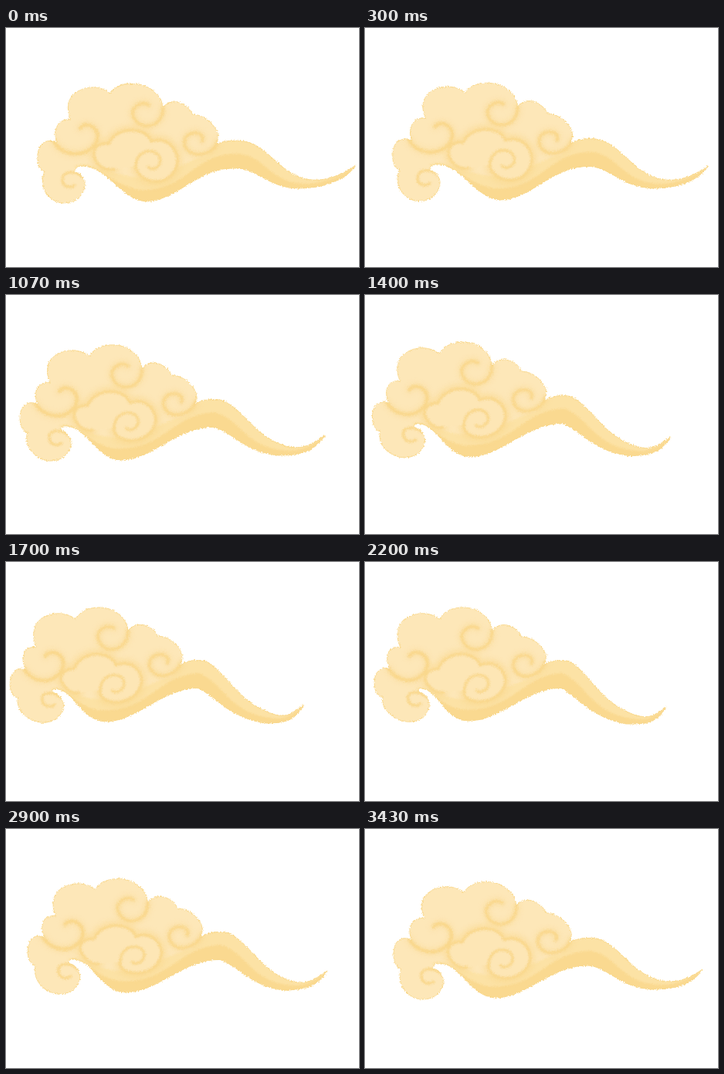
These frames come from a looping animation (457x310 px, 3500 ms). An HTML page:

```html
<!DOCTYPE html>
<html lang="en">
<head>
<meta charset="utf-8">
<title>Drifting cloud</title>
<style>
  html, body { margin: 0; width: 100%; height: 100%; overflow: hidden; background: #fff; }
  svg { display: block; width: 100%; height: 100%; }
</style>
</head>
<body>
<svg viewBox="0 0 457 310">
  <defs>
    <filter id="rough" filterUnits="userSpaceOnUse" x="0" y="0" width="457" height="310" color-interpolation-filters="sRGB">
      <feTurbulence type="fractalNoise" baseFrequency="0.55" numOctaves="2" seed="4" result="n"/>
      <feDisplacementMap in="SourceGraphic" in2="n" scale="4" xChannelSelector="R" yChannelSelector="G"/>
    </filter>
    <filter id="soft" filterUnits="userSpaceOnUse" x="0" y="0" width="457" height="310" color-interpolation-filters="sRGB">
      <feGaussianBlur stdDeviation="0.9"/>
    </filter>
    <filter id="wide" filterUnits="userSpaceOnUse" x="0" y="0" width="457" height="310" color-interpolation-filters="sRGB">
      <feGaussianBlur stdDeviation="3"/>
    </filter>
    <clipPath id="inside"><path data-shape="cloud"/></clipPath>
  </defs>
  <g filter="url(#rough)" stroke-linecap="round" stroke-linejoin="round">
    <path data-shape="cloud" fill="#fde7b8"/>
    <g clip-path="url(#inside)" fill="none">
      <g filter="url(#soft)">
        <path data-shape="belly" fill="#fce2a5"/>
        <path data-shape="deep" fill="#fad990"/>
      </g>
      <g filter="url(#wide)" stroke="#fad88e" stroke-width="8" opacity=".5">
        <path data-shape="leftCurl"/>
        <path data-shape="topCurl"/>
        <path data-shape="rightCurl"/>
        <path data-shape="puff" stroke-width="13"/>
      </g>
      <path data-shape="puff" fill="#fde6b5"/>
      <g filter="url(#soft)" stroke="#f9d78c" stroke-width="3.4">
        <path data-shape="lowCurl"/>
        <path data-shape="leftCurl" stroke-width="4"/>
        <path data-shape="topCurl"/>
        <path data-shape="rightCurl"/>
        <path data-shape="puff"/>
        <path data-shape="puffCurl"/>
      </g>
    </g>
    <path data-shape="cloud" fill="none" stroke="#f9d88c" stroke-width="1"/>
  </g>
</svg>
<script>
const LOOP = 3500, STEPS = 50;

const shapes = {
  cloud: `M50 186 C40 185 38 162 45 152 C50 146 58 145 66 148
    C61 137 65 125 72 121 C76 119 80 118 84 119
    C78 106 79 92 90 84 C104 74 124 75 135 85
    C142 72 164 69 182 76 C195 82 202 92 203 103
    C211 94 222 94 231 100 C237 104 240 107 241 112
    C254 112 269 122 274 137 C275 143 274 147 272 151
    C282 146 297 145 309 147 C340 153 352 187 388 196 C415 201 436 189 453 178
    C440 198 410 208 378 208 C340 207 326 183 299 182
    C250 179 222 224 182 225 C148 223 134 181 100 179
    C91 179 88 183 89 187 C98 188 103 197 102 206
    C99 220 88 227 74 227 C55 226 41 206 50 186 Z`,
  belly: `M88 179 C112 172 120 186 150 190 C200 205 225 172 260 166
    L272 151 L300 140 L457 170 L457 215 L180 240 L100 188 Z`,
  deep: `M96 178 C122 180 140 203 172 210 C235 213 240 163 300 163
    C338 166 340 203 392 202 C420 200 440 188 453 178 L457 215 L180 240 L100 185 Z`,
  lowCurl: `M100 194 C90 183 72 186 73 198 C74 207 84 208 89 204`,
  leftCurl: `M62 147 C70 163 92 167 106 159 C120 152 123 136 112 128 C106 124 99 125 96 130`,
  topCurl: `M203 103 C204 120 192 128 180 127 C166 125 160 110 167 103 C172 97 180 96 185 100`,
  rightCurl: `M274 147 C270 162 250 168 238 161 C226 152 230 137 243 136 C252 135 257 141 254 147`,
  puff: `M140 183 C128 186 116 178 114 165 C113 154 122 148 133 150
    C139 136 155 131 168 133 C178 135 186 140 188 147
    C204 141 220 152 222 170 C222 188 208 200 192 199 C180 198 169 190 168 179`,
  puffCurl: `M168 180 C168 166 178 158 189 160 C200 162 203 174 196 180 C192 184 186 183 184 180`
};

// Handles at rest, with their shifts at each key step
const keys = [0, 9, 15, 24, 31, 41, 49];
const handle = (x, y, dx, dy) => ({ x, y, dx: [0, ...dx], dy: [0, ...dy] });
const bodyX = [-13, -27, -45, -38.5, -19.5, -7];
const bodyY = [-3, -7, -13, -13, -7, -3];
const handles = [
  handle(50, 165, [-12, -23, -36, -29, -13, -4], [-5, -7, -8, -9, -8, -5]),
  handle(75, 205, [-11, -17, -26, -17, -5, 0], [-6, -12, -19, -20, -13, -6]),
  handle(88, 138, bodyX, [-4, -5, -8, -8, -6, -3]),
  handle(110, 92, bodyX, [-2, -5, -10, -10, -6, -2]),
  handle(172, 95, bodyX, [-3, -8, -14, -14, -8, -4]),
  handle(172, 165, [-15, -28, -46, -39, -20, -8], bodyY),
  handle(250, 138, bodyX, [-3, -8, -16, -15, -9, -3]),
  handle(180, 218, [-15, -33, -53, -48, -27, -13], [-5, -11, -18, -19, -13, -6]),
  handle(298, 164, [-16, -30, -50, -45, -22, -8], [-6, -11, -19, -19, -13, -5]),
  handle(343, 182, [-17, -32, -53, -49, -24, -10], [-2, -4, -6, -6, -4, -2]),
  handle(382, 202, [-14, -26, -43, -40, -20, -8], [0, 0, 1, 2, 1, 0]),
  handle(453, 178, [-20, -40, -67, -63, -37, -16], [2, 4, 7, 10, 6, 4])
];

// Smooth curve through the key values
function curve(v, k) {
  const last = keys.length - 1;
  let i = 0;
  while (i < last - 1 && k >= keys[i + 1]) i++;
  const slope = j => {
    const a = Math.max(0, j - 1), b = Math.min(last, j + 1);
    return (v[b] - v[a]) / (keys[b] - keys[a]);
  };
  const h = keys[i + 1] - keys[i], u = (k - keys[i]) / h, w = 1 - u;
  return v[i] * w * w * (1 + 2 * u) + v[i + 1] * u * u * (3 - 2 * u)
    + h * u * w * (slope(i) * w - slope(i + 1) * u);
}

// Each point follows the nearest handles
function warp(x, y, shifts) {
  let sx = 0, sy = 0, sum = 0;
  handles.forEach((p, i) => {
    const w = 1 / ((x - p.x) ** 2 + (y - p.y) ** 2 + 40) ** 2;
    sx += w * shifts[i][0];
    sy += w * shifts[i][1];
    sum += w;
  });
  return (x + sx / sum).toFixed(2) + ' ' + (y + sy / sum).toFixed(2);
}

const paths = [...document.querySelectorAll('[data-shape]')];
let shown = -1;

function draw(time) {
  // The picture advances every 70 ms, held on a 30 Hz grid
  const tick = Math.floor((time % LOOP + 4) * 0.03);
  const step = Math.min(STEPS - 1, Math.floor(tick / 2.1 + 1e-6));
  if (step === shown) return;
  shown = step;
  const shifts = handles.map(p => [curve(p.dx, step), curve(p.dy, step)]);
  const posed = {};
  for (const name in shapes)
    posed[name] = shapes[name].replace(/(\d+) (\d+)/g, (_, x, y) => warp(+x, +y, shifts));
  for (const p of paths) p.setAttribute('d', posed[p.dataset.shape]);
}

function loop() {
  draw(performance.now());
  requestAnimationFrame(loop);
}
loop();
</script>
</body>
</html>
```
